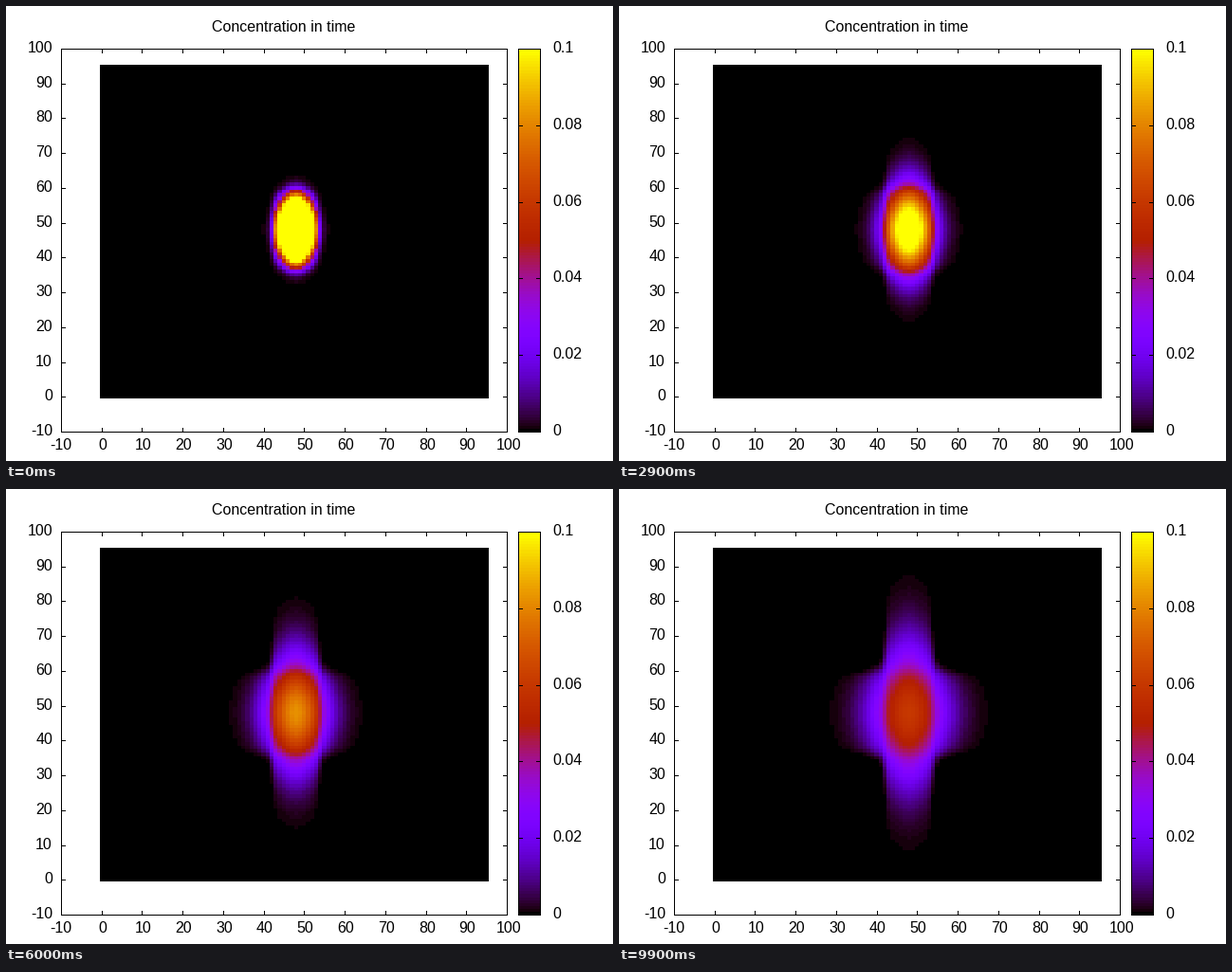
A matplotlib script for the animation above (10 s loop, 640x480 px).

```python
import matplotlib.pyplot as plt
import numpy as np
from matplotlib.animation import FuncAnimation

WIDTH, HEIGHT, DPI = 640, 480, 100
FRAMES, INTERVAL = 100, 100
LEFT, RIGHT, TOP, BOTTOM = 58, 528, 45, 449      # plot border
BAR_LEFT, BAR_RIGHT = 540, 563                   # colour bar border
MAP_X, MAP_Y, MAP_W, MAP_H = 99, 62, 410, 352    # concentration map
CELLS, CENTRE = 96, 48
LEVELS, C_MAX = 128, 0.1

# Diffusion runs along two crossing channels, four times stronger in y,
# and is slowed where each arm leaves the core.
DIFF_X, DIFF_Y = 1.75, 7.0
SLOW_X, SLOW_Y = 0.6, 0.45
EDGE, SOFTNESS = 5.8, 0.4
RADIUS, C_START = 4.85, 0.184
DT, STEPS_PER_FRAME, WARM_UP = 0.02, 5, 25


def palette(fraction):
    """Black, blue, red, yellow in 128 flat levels."""
    level = np.clip(np.floor(fraction * LEVELS), 0, LEVELS - 1)
    v = level / (LEVELS - 1)
    blue = np.clip(np.sin(2 * np.pi * v), 0, 1)
    return np.stack([np.sqrt(v), v ** 3, blue], axis=-1)


def channel(s):
    """Mobility across a channel: one inside, fading to zero at its walls."""
    return 1 / (1 + np.exp((np.abs(s) - EDGE) / SOFTNESS))


def barrier(s, depth):
    """Mobility along a channel, reduced at the edge of the core."""
    return 1 - depth * np.exp(-(np.abs(s) - 6) ** 2)


def spread(c, mobility, axis):
    flux = mobility * np.diff(c, axis=axis)
    return np.diff(flux, axis=axis, prepend=0, append=0)


def simulate():
    cell = np.arange(CELLS) - CENTRE
    face = cell[:-1] + 0.5
    mobility_x = DIFF_X * np.outer(channel(cell / 2), barrier(face, SLOW_X))
    mobility_y = DIFF_Y * np.outer(barrier(face / 2, SLOW_Y), channel(cell))
    radius = np.hypot(cell, cell[:, None] / 2)
    c = C_START * np.clip(RADIUS - radius + 0.5, 0, 1)

    states = []
    for frame in range(FRAMES):
        for _ in range(STEPS_PER_FRAME if frame else WARM_UP):
            c = c + DT * (spread(c, mobility_x, 1) + spread(c, mobility_y, 0))
        states.append(c)
    return states


def cell_sizes(start, length):
    edges = np.floor(start + np.arange(CELLS + 1) * length / CELLS)
    return np.diff(edges).astype(int)


COLUMNS, ROWS = cell_sizes(MAP_X, MAP_W), cell_sizes(MAP_Y, MAP_H)


def map_image(c):
    rgb = palette(c[::-1] / C_MAX)
    return rgb.repeat(ROWS, axis=0).repeat(COLUMNS, axis=1)


fig = plt.figure(figsize=(WIDTH / DPI, HEIGHT / DPI), dpi=DPI, facecolor="white")
ax = fig.add_axes([0, 0, 1, 1])
canvas = np.ones((HEIGHT, WIDTH, 3))


def line(x0, y0, x1, y1):
    """Black one-pixel line, both ends included."""
    canvas[y0:y1 + 1, x0:x1 + 1] = 0


def frame_box(x0, y0, x1, y1):
    for y in (y0, y1):
        line(x0, y, x1, y)
    for x in (x0, x1):
        line(x, y0, x, y1)


def side_ticks(x0, x1, y, size=4):
    line(x0, y, x0 + size, y)
    line(x1 - size, y, x1, y)


def label(x, y, text, align="left"):
    ax.text(x, y, text, ha=align, va="baseline", color="black",
            family="Liberation Sans", fontsize=16 * 72 / DPI)


def draw_axes():
    frame_box(LEFT, TOP, RIGHT, BOTTOM)
    for value in range(-10, 101, 10):
        part = (value + 10) / 110
        x = LEFT + part * (RIGHT - LEFT)
        column = round(x)
        row = round(BOTTOM - part * (BOTTOM - TOP))
        line(column, TOP, column, TOP + 4)
        line(column, BOTTOM - 4, column, BOTTOM)
        side_ticks(LEFT, RIGHT, row)
        text = str(value)
        label(x + 0.4 - 4 * len(text), 468, text)
        label(49, row + 4, text, "right")
    label(293, 27, "Concentration in time", "center")


def draw_colour_bar():
    height = BOTTOM - TOP
    fractions = np.arange(height, -1, -1) / height
    canvas[TOP:BOTTOM + 1, BAR_LEFT:BAR_RIGHT + 1] = palette(fractions)[:, None]
    frame_box(BAR_LEFT, TOP, BAR_RIGHT, BOTTOM)
    for i in range(6):
        row = round(BOTTOM - i * height / 5)
        side_ticks(BAR_LEFT, BAR_RIGHT, row)
        label(576, row + 4, f"{i * 0.02:g}")


def show(image, x, y):
    height, width = image.shape[:2]
    return ax.imshow(image, interpolation="nearest", aspect="auto",
                     extent=[x, x + width, y + height, y])


states = simulate()
draw_axes()
draw_colour_bar()
show(canvas, 0, 0)
heat = show(map_image(states[0]), MAP_X, MAP_Y)
ax.set_xlim(0, WIDTH)
ax.set_ylim(HEIGHT, 0)
ax.axis("off")


def update(frame):
    heat.set_data(map_image(states[frame]))
    return [heat]


animation = FuncAnimation(fig, update, frames=FRAMES, interval=INTERVAL,
                          repeat=True, repeat_delay=0)
plt.show()
```
